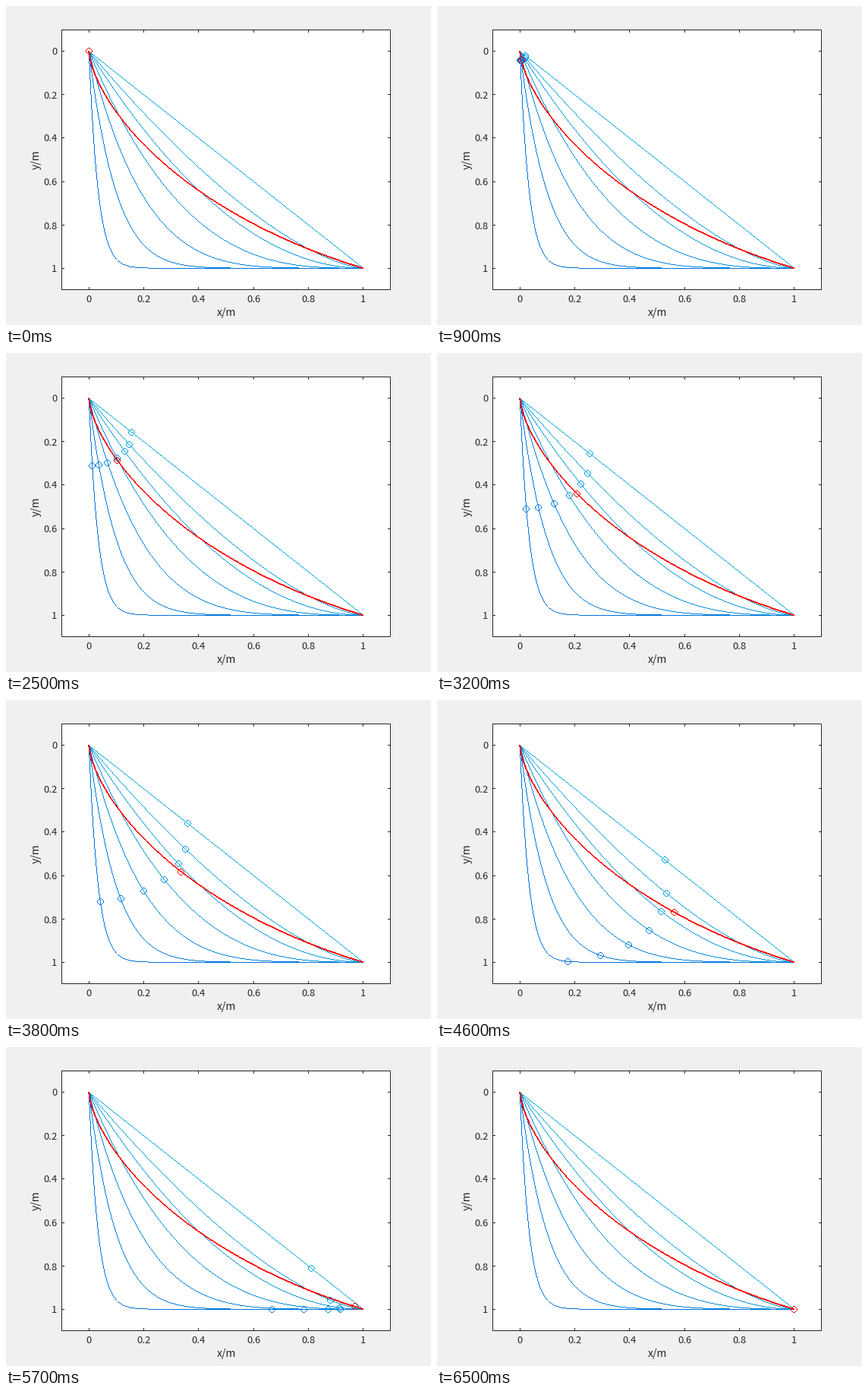
Animation, 560 px wide and 420 px high, one loop 7100 ms. Source, as a matplotlib script:

```python
import numpy as np
import matplotlib.pyplot as plt
from matplotlib.animation import FuncAnimation
from matplotlib.patches import Rectangle

W, H, DPI = 560, 420, 100
G = 10.0            # gravity, m/s^2
DT = 0.01           # simulated seconds per frame
STEPS = 71
POWERS = [1, 1.5, 2, 3, 5, 10, 30]
INK, RED = "#262626", "#ff0000"

X0, X1 = 109.3, 470.7
Y0, Y1 = 59.8, 345.2
LEFT, RIGHT, TOP, BOTTOM = 73.5, 506.5, 31.5, 373.5
TICK = 3.5

plt.rcParams["font.family"] = "Noto Sans CJK JP"
plt.rcParams["path.simplify"] = False


def px(x):
    return X0 + np.asarray(x) * (X1 - X0)


def py(y):
    return Y0 + np.asarray(y) * (Y1 - Y0)


def slide(n, times):
    """Position along y = 1 - (1 - x)^n for a frictionless bead."""
    u = np.linspace(0, 1, 8001)
    mid = (u[1:] + u[:-1]) / 2
    x = mid ** 2
    y = 1 - (1 - x) ** n
    slope = n * (1 - x) ** (n - 1)
    rate = np.sqrt(1 + slope ** 2) / np.sqrt(2 * G * y) * 2 * mid
    t = np.concatenate([[0], np.cumsum(rate * np.diff(u))])
    x = np.interp(times, t, u) ** 2
    return x, 1 - (1 - x) ** n


def cycloid(theta):
    return R * (theta - np.sin(theta)), R * (1 - np.cos(theta))


def end_angle():
    lo, hi = 1.0, 3.0
    for _ in range(60):
        m = (lo + hi) / 2
        if m - np.sin(m) < 1 - np.cos(m):
            lo = m
        else:
            hi = m
    return lo


END = end_angle()
R = 1 / (1 - np.cos(END))

fig = plt.figure(figsize=(W / DPI, H / DPI), dpi=DPI, facecolor="#f0f0f0")
ax = fig.add_axes([0, 0, 1, 1])
ax.set_xlim(0, W)
ax.set_ylim(H, 0)
ax.axis("off")


def stroke(x, y, color, **kw):
    kw.setdefault("solid_capstyle", "butt")
    return ax.plot(x, y, color=color, lw=72 / DPI, snap=False, **kw)[0]


def label(x, y, s, size, ha="center", rotation=0):
    ax.text(x, y, s, size=size * 72 / DPI, color=INK, ha=ha, va="baseline",
            rotation=rotation, rotation_mode="anchor")


def cells(cols, rows):
    """One-pixel dashes that fill the given pixels."""
    gap = np.full(len(cols), np.nan)
    x = np.column_stack([cols, cols + 1, gap]).ravel()
    y = np.column_stack([rows + 0.5, rows + 0.5, gap]).ravel()
    return x, y


def trace(x, y, width=1):
    """Crisp pixels of a falling curve: per column if flat, per row if steep."""
    slope = np.gradient(y, x)
    cols = np.arange(np.floor(x[0]), np.floor(x[-1]) + 1)
    rows = np.arange(np.floor(y[0]), np.floor(y[-1]) + 1)
    cols = cols[np.interp(cols + 0.5, x, slope) <= 1]
    rows = rows[np.interp(rows + 0.5, y, slope) > 1]
    shift = (width - 1) / 2
    at_col = np.floor(np.interp(cols + 0.5, x, y) - shift)
    at_row = np.floor(np.interp(rows + 0.5, y, x) - shift)
    c = [np.append(cols, at_row + j) for j in range(width)]
    r = [np.append(at_col + j, rows) for j in range(width)]
    return cells(np.concatenate(c), np.concatenate(r))


def ring(radius=4):
    k = np.arange(-2, 3)
    far = np.round(np.sqrt(radius ** 2 - k ** 2))
    return np.concatenate([k, k, far, -far]), np.concatenate([far, -far, k, k])


def draw_axes():
    ax.add_patch(Rectangle((LEFT, TOP), RIGHT - LEFT, BOTTOM - TOP,
                           fc="white", ec="none", zorder=0))
    for v in np.arange(6) / 5:
        x, y = np.floor(px(v)) + 0.5, np.floor(py(v)) + 0.5
        for edge, d in ((TOP, TICK), (BOTTOM, -TICK)):
            stroke([x, x], [edge, edge + d], INK)
        for edge, d in ((LEFT, TICK), (RIGHT, -TICK)):
            stroke([edge, edge + d], [y, y], INK)
        label(x, 390.5, f"{v:g}", 13)
        label(67.5, y + 5, f"{v:g}", 13, ha="right")
    stroke([LEFT, RIGHT, RIGHT, LEFT, LEFT],
           [TOP, TOP, BOTTOM, BOTTOM, TOP], INK,
           solid_joinstyle="miter", solid_capstyle="projecting")
    label(290, 408, "x/m", 14)
    label(44, 202.5, "y/m", 14, rotation=90)


draw_axes()
times = np.arange(STEPS) * DT
ring_x, ring_y = ring()
beads, paths = [], []
u = np.linspace(0, 1, 1500) ** 2
for i, n in enumerate(POWERS):
    color = (0, 0.66 - 0.21 * i / (len(POWERS) - 1), 0.87)
    stroke(*trace(px(u), py(1 - (1 - u) ** n)), color)
    beads.append(stroke([], [], color, zorder=5))
    paths.append(slide(n, times))

cx, cy = cycloid(np.linspace(0, END, 800))
stroke(*trace(px(cx), py(cy), 2), RED)
beads.append(stroke([], [], RED, zorder=5))
paths.append(cycloid(np.minimum(times / np.sqrt(R / G), END)))


def update(k):
    for bead, (x, y) in zip(beads, paths):
        bead.set_data(*cells(np.floor(px(x[k])) + ring_x,
                             np.floor(py(y[k])) + ring_y))
    return beads


anim = FuncAnimation(fig, update, frames=STEPS, interval=100,
                     repeat=True, repeat_delay=0, blit=False)
plt.show()
```
